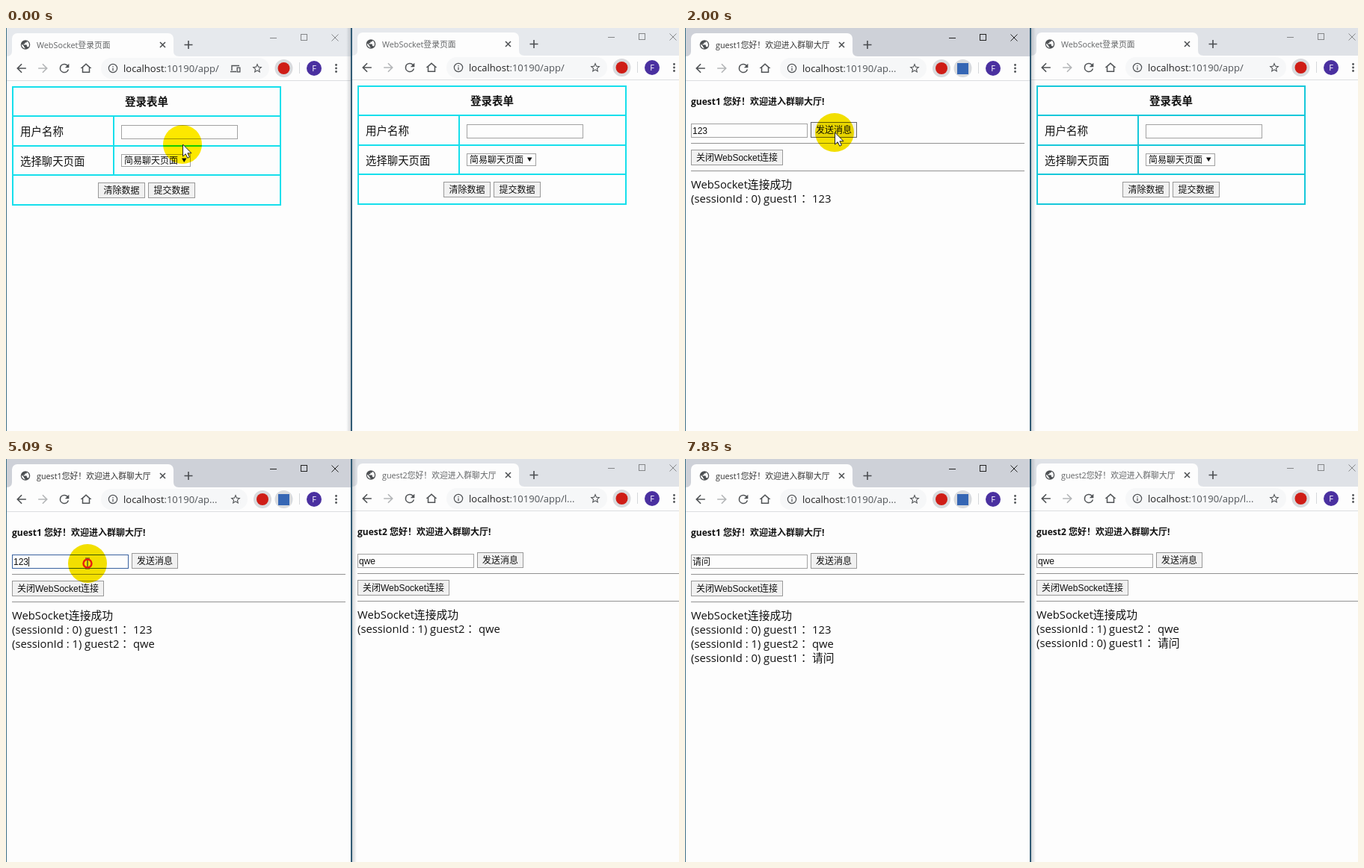
Recreate the animation shown at these times as an HTML page with a canvas. Size 900 px wide and 540 px high, loop 8350 ms.

```html
<!DOCTYPE html>
<html lang="zh">
<head>
<meta charset="utf-8">
<title>WebSocket</title>
<style>
html, body { margin: 0; width: 100%; height: 100%; overflow: hidden; background: #fdfdfd; }
canvas { display: block; }
</style>
</head>
<body>
<canvas id="stage" width="900" height="540"></canvas>
<script>
const ctx = document.getElementById('stage').getContext('2d');
const LOOP = 8350;
const CJK = '"Noto Sans CJK SC", "Noto Sans CJK", sans-serif';
const UI = '"Open Sans", ' + CJK;
const FORM = '"Liberation Sans", ' + CJK;
// The Japanese cut centres the full-width colon.
const LOG = '"Open Sans", "Noto Sans CJK JP", ' + CJK;
const PAPER = '#fdfdfd';
const USERS = ['guest1', 'guest2'];

const ICONS = {
  back: 'M20 11H7.83l5.59-5.59L12 4l-8 8 8 8 1.41-1.41L7.83 13H20v-2z',
  forward: 'M12 4l-1.41 1.41L16.17 11H4v2h12.17l-5.58 5.59L12 20l8-8z',
  reload: 'M17.65 6.35A7.96 7.96 0 0 0 12 4a8 8 0 1 0 7.73 10h-2.08A6 6 0 1 1 12 6c1.66 0 3.14.69 4.22 1.78L13 11h7V4l-2.35 2.35z',
  home: 'M12 3L2 12h3v8h14v-8h3L12 3zm0 2.7l5 4.5V18H7v-7.8l5-4.5z',
  star: 'M22 9.24l-7.19-.62L12 2 9.19 8.63 2 9.24l5.46 4.73L5.82 21 12 17.27 18.18 21l-1.63-7.03zM12 15.4l-3.76 2.27 1-4.28-3.32-2.88 4.38-.38L12 6.1l1.71 4.04 4.38.38-3.32 2.88 1 4.28z',
  info: 'M11 17h2v-6h-2zM12 2a10 10 0 1 0 0 20 10 10 0 0 0 0-20zm0 18a8 8 0 1 1 0-16 8 8 0 0 1 0 16zM11 9h2V7h-2z',
  globe: 'M12 2a10 10 0 1 0 0 20 10 10 0 0 0 0-20zm-1 17.93A8 8 0 0 1 4.21 10.21L9 15v1a2 2 0 0 0 2 2zm6.9-2.54A2 2 0 0 0 16 16h-1v-3a1 1 0 0 0-1-1H8v-2h2a1 1 0 0 0 1-1V7h2a2 2 0 0 0 2-2v-.41a8 8 0 0 1 2.9 12.8z'
};
for (const name in ICONS) ICONS[name] = new Path2D(ICONS[name]);

// Messages: [session, text]
const FIRST = [0, '123'], REPLY = [1, 'qwe'], LAST = [0, '请问'];

// Each step changes only the fields it lists.
const STEPS = [
  [0, { active: -1, cyan: '#16dfec', bar: '#e6e9ed', yellow: '#ffea00', pointer: [236, 156], shape: 'arrow',
        chat: [false, false], input: ['', ''], logs: [[], []], focus: false, caret: false, selected: false,
        loading: false, device: true, plugin: false }],
  [500, { active: 0, cyan: '#16c8da', bar: '#dfe2e7', yellow: '#f4e100', pointer: [226, 140], shape: 'beam',
          focus: true, caret: true, device: false }],
  [1000, { input: ['guest1', ''], pointer: [222, 218], shape: 'arrow', caret: false }],
  [1500, { pointer: [311, 199], focus: false, loading: true, plugin: true }],
  [2000, { loading: false, chat: [true, false], input: ['123', ''], logs: [[FIRST], []], pointer: [200, 140] }],
  [2500, { active: 1, input: ['123', 'guest2'], pointer: [683, 217] }],
  [3000, { chat: [true, true], input: ['123', ''], pointer: [681, 202] }],
  [3500, { input: ['123', 'qwe'], pointer: [600, 140] }],
  [4000, { logs: [[FIRST, REPLY], [REPLY]], pointer: [671, 142] }],
  [4590, { pointer: [390, 141] }],
  [5090, { active: 0, focus: true, caret: true, pointer: [109, 140], shape: 'click' }],
  [5590, { pointer: [22, 138], shape: 'beam', caret: false, selected: true }],
  [6350, { input: ['请问', 'qwe'], selected: false, caret: true }],
  [6850, { pointer: [200, 140], shape: 'arrow', caret: false }],
  [7350, { logs: [[FIRST, REPLY, LAST], [REPLY, LAST]], focus: false }],
  [7850, { pointer: null }]
];

function stateAt(time) {
  return Object.assign({}, ...STEPS.filter(step => step[0] <= time).map(step => step[1]));
}

function box(x, y, w, h, fill, stroke, line = 1) {
  if (fill) { ctx.fillStyle = fill; ctx.fillRect(x, y, w, h); }
  if (stroke) {
    ctx.strokeStyle = stroke;
    ctx.lineWidth = line;
    ctx.strokeRect(x + line / 2, y + line / 2, w - line, h - line);
  }
}

function disc(x, y, r, fill) {
  ctx.fillStyle = fill;
  ctx.beginPath();
  ctx.arc(x, y, r, 0, 7);
  ctx.fill();
}

function lines(color, width, ...paths) {
  ctx.strokeStyle = color;
  ctx.lineWidth = width;
  ctx.beginPath();
  for (const [x, y, ...rest] of paths) {
    ctx.moveTo(x, y);
    for (let i = 0; i < rest.length; i += 2) ctx.lineTo(rest[i], rest[i + 1]);
  }
  ctx.stroke();
}

const cross = (x, y, r, color, width = 1.2) =>
  lines(color, width, [x - r, y - r, x + r, y + r], [x + r, y - r, x - r, y + r]);

// y is the middle of the line of text.
function text(str, x, y, size, { color = '#111', family = UI, weight = 400, align = 'left' } = {}) {
  ctx.font = `${weight} ${size}px ${family}`;
  ctx.fillStyle = color;
  ctx.textAlign = align;
  ctx.fillText(str, x, y + size * 0.37);
  return ctx.measureText(str).width;
}

function icon(name, x, y, size, color) {
  ctx.save();
  ctx.translate(x - size / 2, y - size / 2);
  ctx.scale(size / 24, size / 24);
  ctx.fillStyle = color;
  ctx.fill(ICONS[name], 'evenodd');
  ctx.restore();
}

function button(label, x, y, w, dark) {
  box(x, y, w, 21, '#f1f1f1', dark ? '#666' : '#999');
  text(label, x + w / 2, y + 11, 12, { family: FORM, align: 'center' });
}

function field(value, x, y, w, h, s, focused) {
  box(x, y, w, h, PAPER, focused ? '#3a62a0' : '#a2a2a2');
  if (s.loading && value) {
    box(x + 1, y + 1, w - 2, h - 2, '#e6ebed');
    lines('#777', 2, [x + 1, y + h, x + 1, y + 1, x + w, y + 1]);
  }
  const style = { family: FORM };
  ctx.font = '12px ' + FORM;
  const width = ctx.measureText(value).width;
  if (focused && s.selected) {
    box(x + 2, y + 3, width, h - 6, '#2f7bd8');
    style.color = '#fff';
  }
  text(value, x + 2, y + h / 2, 12, style);
  if (focused && s.caret) box(x + 2 + width, y + 3, 1, h - 6, '#222');
}

function loginPage(side, s) {
  const focused = s.focus && s.active === side;
  box(8, 78, 360, 160, null, s.cyan, 2);
  lines(s.cyan, 2, [9, 118, 367, 118], [9, 158, 367, 158], [9, 197, 367, 197], [144, 118, 144, 197]);
  text('登录表单', 188, 99, 14.5, { weight: 700, align: 'center' });
  text('用户名称', 19, 139, 14.5);
  text('选择聊天页面', 19, 178.5, 14.4);
  field(s.input[side], 154, 130, 156, 19, s, focused);
  box(154, 169, 93, 17, PAPER, '#a2a2a2');
  text('简易聊天页面', 158, 178, 12, { family: FORM });
  ctx.fillStyle = '#111';
  ctx.beginPath();
  ctx.moveTo(235, 174.5);
  ctx.lineTo(241.5, 174.5);
  ctx.lineTo(238.2, 180);
  ctx.fill();
  button('清除数据', 123, 207, 63);
  button('提交数据', 190, 207, 63, s.loading && side === 0);
}

function chatPage(side, s) {
  const right = side ? 440 : 454;
  const [x, y] = s.pointer || [0, 0];
  const hover = Math.abs(x - side * 462 - 199) < 31 && Math.abs(y - 137) < 10;
  text(USERS[side] + ' 您好！欢迎进入群聊大厅!', 8, 99, 12, { weight: 700 });
  field(s.input[side], 8, 128, 156, 19, s, s.focus && s.active === side);
  button('发送消息', 168, 126, 62, hover);
  button('关闭WebSocket连接', 8, 163, 123);
  for (const rule of [154, 191]) box(8, rule, right - 8, 1, '#929292');
  text('WebSocket连接成功', 8, 210, 14.8);
  s.logs[side].forEach(([session, message], i) =>
    text(`(sessionId : ${session}) ${USERS[session]}： ${message}`, 8, 229 + i * 19, 14.8, { family: LOG }));
}

function tabStrip(side, s, shift) {
  const active = s.active === side;
  const ink = active ? '#222' : '#858789';
  box(0, -2, 470, 40, active ? '#ced1d8' : s.bar);
  ctx.fillStyle = PAPER;
  ctx.beginPath();
  ctx.moveTo(1, 38);
  ctx.quadraticCurveTo(8, 38, 8, 31);
  ctx.arcTo(8, 7, 16, 7, 7);
  ctx.arcTo(224, 7, 224, 15, 7);
  ctx.lineTo(224, 31);
  ctx.quadraticCurveTo(224, 38, 231, 38);
  ctx.fill();

  const busy = side === 0 && s.loading;
  if (busy) {
    ctx.strokeStyle = '#4468b4';
    ctx.lineWidth = 1.8;
    ctx.beginPath();
    ctx.arc(26, 23, 6, -0.6, 3.9);
    ctx.stroke();
  } else {
    icon('globe', 26, 22.5, 15, '#4c4f52');
  }
  const title = s.chat[side] || busy ? USERS[side] + '您好！欢迎进入群聊大厅' : 'WebSocket登录页面';
  text(title, 41, 23, 10.8, { color: active ? '#333' : '#626466' });
  cross(209.5, 22.5, 3.5, '#4a4d50', 1.5);
  lines('#4a4d50', 1.6, [238.5, 22.5, 249.5, 22.5], [244, 17, 244, 28]);
  lines(ink, 1, [353 - shift, 13.5, 362 - shift, 13.5]);
  box(394 - shift, 8, 9, 9, null, ink);
  cross(440 - shift, 13, 4.5, ink, 1);
}

function toolbar(side, s, shift) {
  const plugin = side === 0 && s.plugin;
  const busy = side === 0 && s.loading;
  const starX = (plugin ? 307 : 336) - shift;
  const gray = '#505356';
  box(0, 38, 470, 32, PAPER);
  box(0, 70, 470, 1, '#dcdee0');
  ctx.fillStyle = '#f6f7f8';
  ctx.beginPath();
  ctx.roundRect(127, 40, starX - 111, 28, 14);
  ctx.fill();

  icon('back', 20.5, 54, 19, gray);
  icon('forward', 49.5, 54, 19, '#b4b6b8');
  if (busy) cross(78, 54, 5, gray, 1.8);
  else icon('reload', 78, 54, 19, gray);
  icon('home', 107, 54, 18, gray);
  icon('info', 143, 54, 15, gray);
  const host = text('localhost', 157, 54, 13, { color: '#222' });
  const path = plugin ? '/ap...' : s.chat[side] ? '/app/l...' : '/app/';
  text(':10190' + path, 157 + host, 54, 13, { color: '#505458' });

  if (side === 0 && s.device) {
    lines(gray, 1.4, [300, 58.5, 308, 58.5], [302, 57, 302, 50.5, 312, 50.5]);
    box(308.5, 52.5, 5, 7, null, gray, 1.3);
  }
  icon('star', starX, 54, 16, gray);
  const blockX = (plugin ? 343 : 371.5) - shift;
  disc(blockX, 54, 12, '#d9dbde');
  disc(blockX, 54, 8, '#cf1d16');
  if (plugin) {
    disc(371.5, 54, 12, '#d9dbde');
    box(364, 47, 15, 15, '#3566b4');
  }
  box(392 - shift, 46, 1, 15, '#d5d7da');
  disc(412 - shift, 54, 10, '#4a30a0');
  text('F', 412 - shift, 54, 11, { color: '#fff', align: 'center' });
  for (const y of [49.5, 54, 58.5]) disc(441.5 - shift, y, 1.4, gray);
}

function browser(side, s) {
  const shift = side * 10;
  ctx.save();
  ctx.beginPath();
  ctx.rect(side * 462, 0, side ? 438 : 462, 540);
  ctx.clip();
  ctx.translate(side * 462, -side);
  box(0, 0, 470, 545, PAPER);
  tabStrip(side, s, shift);
  toolbar(side, s, shift);
  (s.chat[side] ? chatPage : loginPage)(side, s);
  ctx.restore();
}

// The window in front casts a soft edge on its neighbour.
function seam(active) {
  const end = active === 0 ? 469 : 455;
  const shade = ctx.createLinearGradient(462, 0, end, 0);
  shade.addColorStop(0, 'rgba(70,80,90,.28)');
  shade.addColorStop(1, 'rgba(70,80,90,0)');
  box(Math.min(end, 462), 0, 7, 540, shade);
  box(461, 0, 2, 540, '#315b75');
  box(0, 0, 1, 540, '#3f7187');
}

function pointer({ pointer: at, shape, yellow }) {
  if (!at) return;
  ctx.save();
  ctx.translate(...at);
  ctx.globalCompositeOperation = 'multiply';
  disc(0, 0, 26, yellow);
  ctx.globalCompositeOperation = 'source-over';
  if (shape === 'arrow') {
    const arrow = new Path2D('M.5 0V16L4.2 12.7 6.8 18.2 9.4 17 6.9 11.7H12z');
    ctx.fillStyle = '#fff';
    ctx.fill(arrow);
    ctx.strokeStyle = '#222';
    ctx.lineWidth = 1;
    ctx.stroke(arrow);
  } else {
    lines('#333', 1.2, [-3, -7, 3, -7], [0, -7, 0, 7], [-3, 7, 3, 7]);
    if (shape === 'click') {
      ctx.strokeStyle = '#e81c10';
      ctx.lineWidth = 2.4;
      ctx.beginPath();
      ctx.arc(0, 0, 5.5, 0, 7);
      ctx.stroke();
    }
  }
  ctx.restore();
}

function draw(now) {
  const s = stateAt(now % LOOP);
  browser(0, s);
  browser(1, s);
  seam(s.active);
  pointer(s);
  requestAnimationFrame(draw);
}
draw(0);
</script>
</body>
</html>
```
